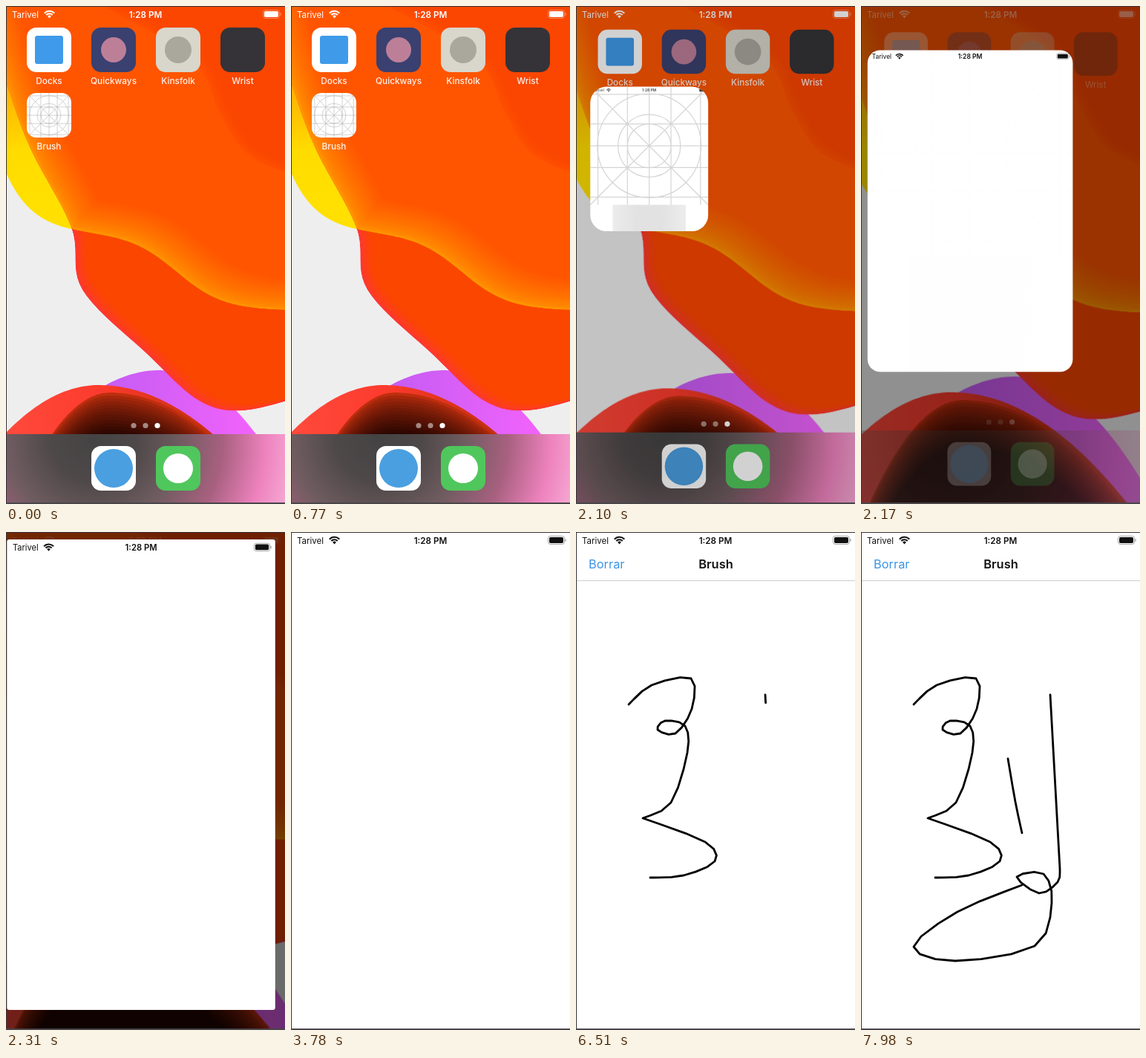
An HTML page with a canvas that plays this animation: 376 by 670 pixels, repeating every 8000 ms.

```html
<!DOCTYPE html>
<html lang="en">
<head>
<meta charset="utf-8">
<title>Drawing app demo</title>
<style>
html, body { margin: 0; width: 100%; height: 100%; overflow: hidden; background: #fff; }
canvas { display: block; width: 376px; height: 670px; }
</style>
</head>
<body>
<canvas id="stage" width="376" height="670"></canvas>
<script>
const W = 376, H = 670, LOOP = 8000, STEP = 70;
const FONT = 'Inter, "Liberation Sans", sans-serif';
const ctx = document.getElementById('stage').getContext('2d');

const clamp = v => Math.max(0, Math.min(1, v));
const lerp = (a, b, k) => a + (b - a) * k;
const progress = (t, from, to) => clamp((t - from) / (to - from));
const mix = (a, b, k) => `rgb(${a.map((v, i) => Math.round(lerp(v, b[i], k)))})`;

function text(g, s, x, y, size, color, weight = 400, align = 'left') {
  g.font = `${weight} ${size}px ${FONT}`;
  g.textAlign = align;
  g.fillStyle = color;
  g.fillText(s, x, y);
}

function box(g, x, y, w, h, r, color) {
  g.beginPath();
  g.roundRect(x, y, w, h, r);
  g.fillStyle = color;
  g.fill();
}

function disc(g, x, y, r, color) {
  g.beginPath();
  g.arc(x, y, r, 0, 7);
  g.fillStyle = color;
  g.fill();
}

// Fills a gradient with evenly spaced colours
function spread(grad, ...colors) {
  colors.forEach((c, i) => grad.addColorStop(i / (colors.length - 1), c));
  return grad;
}

// Samples a smooth curve through key points, n steps between each two
function spline(keys, n = 3) {
  const key = i => keys[Math.max(0, Math.min(keys.length - 1, i))];
  const pts = [keys[0]];
  for (let i = 0; i < keys.length - 1; i++) {
    const [a, b, c, d] = [key(i - 1), key(i), key(i + 1), key(i + 2)];
    for (let j = 1; j <= n; j++) {
      const k = j / n;
      pts.push([0, 1].map(m => b[m] + 0.5 * k * (c[m] - a[m] +
        k * (2 * a[m] - 5 * b[m] + 4 * c[m] - d[m] + k * (3 * (b[m] - c[m]) + d[m] - a[m])))));
    }
  }
  return pts;
}

function graph(f, from = -40, to = W + 44) {
  const pts = [];
  for (let x = from; x <= to; x += 4) pts.push([x, f(x)]);
  return pts;
}

function area(pts) {
  const path = new Path2D();
  pts.forEach(p => path.lineTo(...p));
  path.closePath();
  return path;
}

// Repeats a shape, shifting it and its colour, clipped to the first one
function bands(g, path, dx, dy, from, to, n = 14) {
  g.save();
  g.clip(path);
  for (let i = 0; i <= n; i++) {
    g.save();
    g.translate(dx * i / n, dy * i / n);
    g.fillStyle = mix(from, to, (i / n) ** 0.7);
    g.fill(path);
    g.restore();
  }
  g.restore();
}

// A hill with its own steepness on each side
const hill = (cx, top, left, right) =>
  area(graph(x => top + (x - cx) ** 2 * (x < cx ? left : right), -260, 600));

const wave = x => 224 + 82 * (1 - Math.exp(-x / 36)) + 104 / (1 + Math.exp((230 - x) / 32));

function makeWallpaper() {
  const c = document.createElement('canvas');
  c.width = W;
  c.height = H;
  const g = c.getContext('2d');
  box(g, 0, 0, W, H, 0, '#eeeeef');

  g.fillStyle = spread(g.createLinearGradient(130, 0, 340, 0), '#c45cf4', '#f263fb');
  g.fill(hill(207, 490, 0.0038, 0.0051));
  g.fillStyle = spread(g.createLinearGradient(0, 0, 270, 0), '#ff4a3c', '#fb3a2c', '#c8300f');
  g.fill(hill(125, 510, 0.0041, 0.0028));
  bands(g, hill(140, 520, 0.0092, 0.0031), 0, 58, [190, 46, 14], [34, 4, 0]);

  const right = W + 40;
  g.fillStyle = spread(g.createLinearGradient(0, 40, 40, 270), '#ff7600', '#ffb400', '#ffdc00', '#ffe000');
  g.fill(area([[-40, -60], ...graph(wave, -12), [right, -60]]));

  const side = spline([[-40, -30], [0, 102], [33, 192], [88, 298], [103, 382], [192, 470], [260, 531], [322, 544], [right, 520]], 10);
  bands(g, area([...side, [right, -60]]), 16, -10, [255, 54, 52], [251, 70, 0]);
  const body = [...side.filter(p => p[1] < 299), ...graph(wave, 90)];
  bands(g, area([...body, [right, -90], [-60, -90]]), 34, -40, [255, 146, 0], [255, 85, 0]);

  const corner = spline([[130, 0], [250, 72], [290, 148], [330, 203], [right, 238]], 10);
  bands(g, area([...corner, [right, 0]]), 12, -10, [255, 80, 0], [250, 70, 0]);
  return c;
}

function statusBar(g, ink) {
  text(g, 'Tarivel', 8, 15.5, 11.5, ink);
  text(g, '1:28 PM', 188, 15.5, 11.7, ink, 600, 'center');
  g.strokeStyle = ink;
  const wedge = [-Math.PI * 0.76, -Math.PI * 0.24];
  g.lineWidth = 2.1;
  for (const r of [9.2, 5.8]) {
    g.beginPath();
    g.arc(58.5, 16, r, ...wedge);
    g.stroke();
  }
  g.beginPath();
  g.moveTo(58.5, 16.6);
  g.arc(58.5, 16, 3.3, ...wedge);
  g.fillStyle = ink;
  g.fill();

  box(g, 348, 7, 19, 8, 1.8, ink);
  g.save();
  g.globalAlpha *= 0.35;
  g.beginPath();
  g.roundRect(346.5, 5.5, 22, 11, 3);
  g.lineWidth = 1;
  g.stroke();
  box(g, 369.3, 9, 1.4, 4, 0.7, ink);
  g.restore();
}

// Layout grid, fitted to a square of the given size
function gridIcon(g, cx, cy, size, color) {
  const s = size / 2;
  g.save();
  g.translate(cx, cy);
  g.strokeStyle = color;
  g.lineWidth = Math.max(0.6, size / 130);
  g.beginPath();
  for (const k of [-0.87, -0.37, 0, 0.37, 0.87]) {
    g.moveTo(k * s, -s); g.lineTo(k * s, s);
    g.moveTo(-s, k * s); g.lineTo(s, k * s);
  }
  for (const k of [-1, 1]) {
    g.moveTo(-s, -s * k); g.lineTo(s, s * k);
  }
  for (const r of [0.88, 0.53, 0.37]) {
    g.moveTo(r * s, 0);
    g.arc(0, 0, r * s, 0, Math.PI * 2);
  }
  g.stroke();
  g.restore();
}

const column = i => 28 + 87 * i;
const tile = (x, y, color) => box(ctx, x, y, 60, 60, 13, color);
const label = (s, x, y) => text(ctx, s, x + 30, y, 11.8, 'rgba(255,255,255,.92)', 500, 'center');

const apps = [
  { name: 'Docks', back: '#fff', mark: '#3f9bea', size: 38, corner: 3 },
  { name: 'Quickways', back: '#3a4070', mark: '#bd7f98', size: 34, corner: 17 },
  { name: 'Kinsfolk', back: '#d9d6cb', mark: '#aaa79d', size: 36, corner: 18 },
  { name: 'Wrist', back: '#353337' }
];
const dock = [
  { back: '#fff', mark: '#4a9fe0', size: 52, corner: 26 },
  { back: '#50c75c', mark: '#fff', size: 40, corner: 20 }
];

function icon({ name, back, mark, size, corner }, x, y) {
  tile(x, y, back);
  if (mark) box(ctx, x + 30 - size / 2, y + 30 - size / 2, size, size, corner, mark);
  if (name) label(name, x, y + 76);
}

function homeIcons(pressed, opening) {
  const glow = ctx.createRadialGradient(118, 582, 0, 118, 582, 290);
  box(ctx, -10, 576, W + 20, 104, 0, spread(glow, '#444343', '#4e4849', '#6f5c60', '#a8607f', '#ee82be', '#f9b8dc'));
  for (let i = 0; i < 3; i++) disc(ctx, 172 + 16 * i, 564.5, 3.6, i < 2 ? 'rgba(255,255,255,.5)' : '#fff');
  apps.forEach((a, i) => icon(a, column(i), 29));
  dock.forEach((a, i) => icon(a, column(i + 1), 592));

  if (opening) return;
  ctx.save();
  tile(28, 117, '#fff');
  ctx.clip();
  gridIcon(ctx, 58, 147, 60, '#b4b4b4');
  ctx.restore();
  if (pressed) tile(28, 117, 'rgba(0,0,0,.4)');
  label('Brush', 28, 193);
}

const wallpaper = makeWallpaper();

function centred(scale, fn) {
  ctx.save();
  ctx.translate(188, 335);
  ctx.scale(scale, scale);
  ctx.translate(-188, -335);
  fn();
  ctx.restore();
}

function home(p, pressed) {
  centred(1 + 0.08 * p, () => ctx.drawImage(wallpaper, 0, 0));
  const gone = progress(p, 0.35, 0.85);
  ctx.globalAlpha = 1 - gone;
  centred(1 - 0.03 * p, () => homeIcons(pressed, p > 0));
  ctx.globalAlpha = 1 - 0.8 * gone;
  statusBar(ctx, '#fff');
  ctx.globalAlpha = 1;
  box(ctx, 0, 0, W, H, 0, `rgba(0,0,0,${0.58 * p})`);
}

// The icon grows into the app; its height lags behind its width
function appWindow(p) {
  const w = lerp(60, W, p), h = lerp(60, H - 1, p ** 1.3);
  const x = lerp(58, 188, p) - w / 2, y = lerp(147, 335, p) - h / 2;
  ctx.save();
  ctx.translate(x, y);
  box(ctx, 0, 0, w, h, (13 + 60 * p) * (1 - p), '#fff');
  ctx.clip();
  ctx.globalAlpha = 1 - progress(p, 0.15, 0.7);
  gridIcon(ctx, w / 2, w / 2, w, '#c4c4c4');
  const shade = ctx.createLinearGradient(w * 0.19, 0, w * 0.81, 0);
  box(ctx, w * 0.19, w, w * 0.62, Math.max(0, h - w), 0, spread(shade, '#e4e4e4', '#d6d6d6', '#d6d6d6', '#e4e4e4'));
  ctx.globalAlpha = clamp(p * 2.5);
  ctx.scale(w / W, w / W);
  statusBar(ctx, '#111');
  ctx.restore();
}

function navBar(alpha) {
  ctx.globalAlpha = alpha;
  box(ctx, 0, 65, W, 1, 0, '#cfcfcf');
  text(ctx, 'Borrar', 17, 49, 16.4, '#3b95e6');
  text(ctx, 'Brush', 188.5, 49, 16.4, '#111', 600, 'center');
  ctx.globalAlpha = 1;
}

// Pen strokes; a sharp turn starts a new spline
const strokes = [
  { from: 5030, to: 5880, pts: [
    ...spline([[71, 232], [102, 206], [155, 197], [156, 238], [134, 271], [110, 266], [120, 254], [147, 261], [150, 297], [128, 364], [90, 385]]),
    ...spline([[90, 385], [174, 417], [187, 443], [145, 462], [100, 465]])] },
  { from: 6500, to: 7210, pts: [
    ...spline([[255, 219], [268, 453]], 8),
    ...spline([[268, 453], [265, 471], [240, 486], [210, 464], [246, 460], [257, 499], [234, 557], [127, 577], [71, 558], [130, 511], [217, 475]])] },
  { from: 7680, to: 7840, pts: spline([[198, 305], [208, 363], [217, 405]]) }
];

function drawStroke({ from, to, pts }, t) {
  const reach = progress(t, from, to) * (pts.length - 1);
  if (!reach) return;
  const i = Math.floor(reach), a = pts[i], b = pts[i + 1] || a;
  ctx.strokeStyle = '#000';
  ctx.lineWidth = 2.8;
  ctx.lineCap = ctx.lineJoin = 'round';
  ctx.beginPath();
  pts.slice(0, i + 1).forEach(p => ctx.lineTo(...p));
  ctx.lineTo(lerp(a[0], b[0], reach - i), lerp(a[1], b[1], reach - i));
  ctx.stroke();
  ctx.lineCap = 'butt';
}

function render(t) {
  const s = Math.max(0, (t - 2036) * 0.0177);
  const p = t > 2590 ? 1 : 1 - (1 + s) * Math.exp(-s);
  if (p < 1) {
    home(p, t >= 1890);
    if (p > 0) appWindow(p);
  } else {
    box(ctx, 0, 0, W, H, 0, '#fff');
    statusBar(ctx, '#111');
    navBar(progress(t, 3780, 4130));
    strokes.forEach(k => drawStroke(k, t));
  }
  box(ctx, 0, 0, W, 1, 0, '#38343a');
  box(ctx, 0, 0, 1, H, 0, '#38343a');
  box(ctx, 0, 668, W, 2, 0, '#4a464a');
}

const start = performance.now();
function tick() {
  const t = (performance.now() - start) % LOOP;
  render(Math.floor(t / STEP) * STEP);
  requestAnimationFrame(tick);
}
tick();
</script>
</body>
</html>
```
